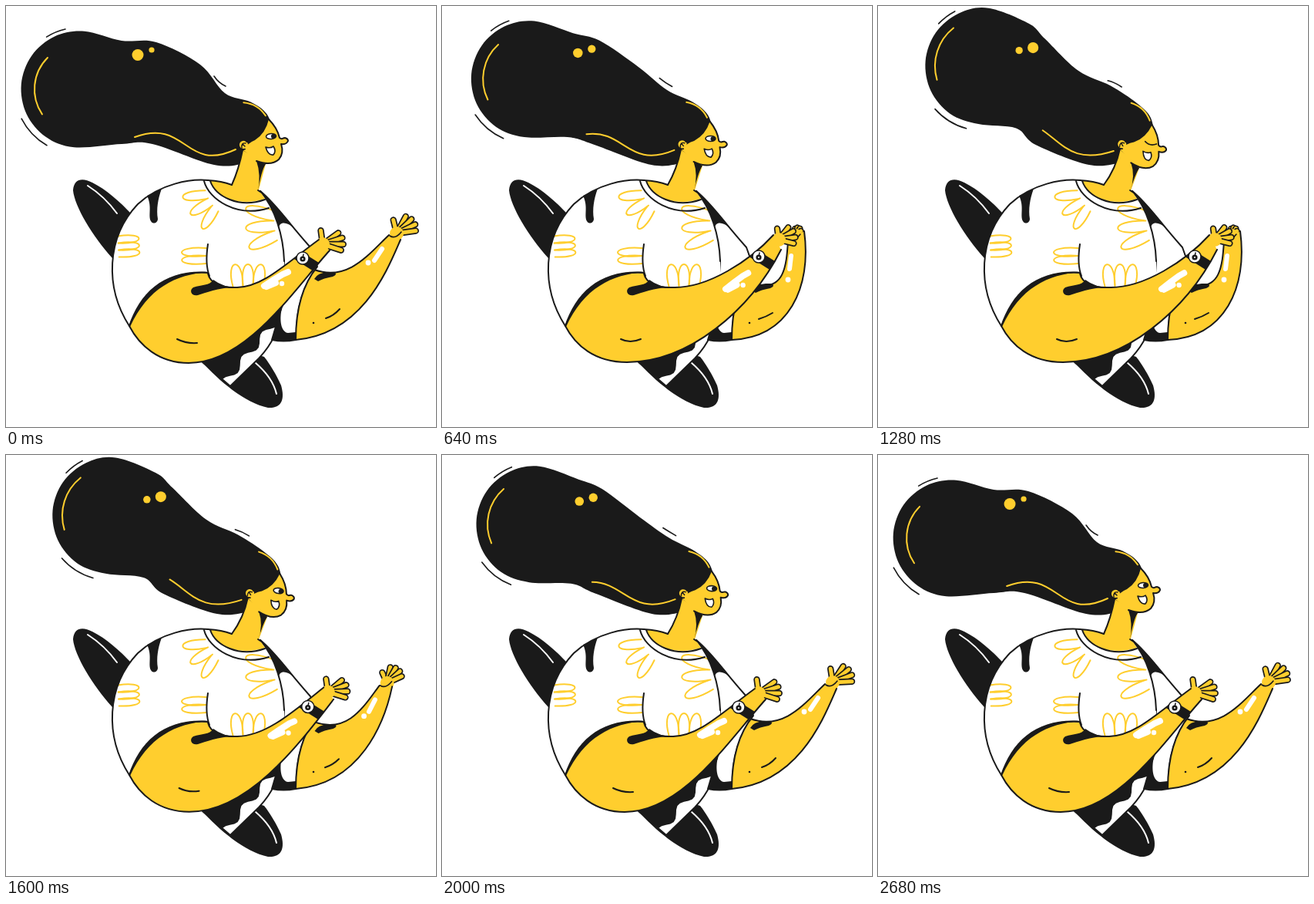
Animation of 558 by 546 pixels, one loop 2720 ms. Source, as an HTML page with a canvas:

```html
<!DOCTYPE html>
<html>
<head>
<meta charset="utf-8">
<style>
html, body { margin: 0; width: 100%; height: 100%; overflow: hidden; background: #fff; }
canvas { display: block; width: 558px; height: 546px; }
</style>
</head>
<body>
<canvas id="stage" width="558" height="546"></canvas>
<script>
const ctx = document.getElementById('stage').getContext('2d');
const INK = '#1a1a1a', SUN = '#ffce2e', WHITE = '#fff';
const LOOP = 2720, STEP = 40, RAD = Math.PI / 180;
const NAPE = { x: 316, y: 217 };

const clamp = v => Math.max(0, Math.min(1, v));
const ramp = (t, from, to) => { const u = clamp((t - from) / (to - from)); return u * u * (3 - 2 * u); };
const lerp = (a, b, k) => a + (b - a) * k;
const mix = (a, b, k) => a.map((v, i) => lerp(v, b[i], k));
const polar = (x, y, r, deg) => [x + r * Math.cos(deg * RAD), y + r * Math.sin(deg * RAD)];

function asPath(path) { return typeof path === 'string' ? new Path2D(path) : path; }
function fill(path, color) { ctx.fillStyle = color; ctx.fill(asPath(path)); }
function line(path, color = INK, width = 2) {
  ctx.strokeStyle = color;
  ctx.lineWidth = width;
  ctx.stroke(asPath(path));
}
function arc(x, y, r, from = 0, to = 360) {
  const path = new Path2D();
  path.arc(x, y, r, from * RAD, to * RAD);
  return path;
}
function dot(x, y, r, color) { fill(arc(x, y, r), color); }
function oval(x, y, rx, ry) {
  const path = new Path2D();
  path.ellipse(x, y, rx, ry, -0.08, 0, 7);
  return path;
}

// Start point followed by cubic segments, as SVG path data
const cubics = p => `${p.slice(0, 2)}C${p.slice(2)}`;

function smoothLoop(points) {
  const path = new Path2D(), n = points.length;
  points.forEach((b, i) => {
    const a = points[(i + n - 1) % n], c = points[(i + 1) % n], d = points[(i + 2) % n];
    if (!i) path.moveTo(...b);
    path.bezierCurveTo(b[0] + (c[0] - a[0]) / 6, b[1] + (c[1] - a[1]) / 6,
      c[0] - (d[0] - b[0]) / 6, c[1] - (d[1] - b[1]) / 6, ...c);
  });
  return path;
}

function turned(x, y, angle) {
  const dx = x - NAPE.x, dy = y - NAPE.y, c = Math.cos(angle), s = Math.sin(angle);
  return [NAPE.x + dx * c - dy * s, NAPE.y + dx * s + dy * c];
}

function drawLegs() {
  fill('M138 327C112 298 89 260 87 239C88 224 99 222 112 229C130 238 147 253 164 271Z', INK);
  line('M106 233Q128 247 144 269', WHITE);
  fill('M255 462C275 485 310 515 340 521C358 522 362 510 357 492C350 477 343 465 335 455L290 440Z', INK);
  line('M324 463Q346 482 351 503', WHITE);

  const thigh = 'M255 462L291 493L328 457C346 438 354 420 357 392L270 400Z';
  fill(thigh, WHITE);
  let shorts = 'M260 420L255 462';
  for (let s = 0; s <= 1.001; s += 0.04) {
    const bulge = 10 * Math.sin(3 * Math.PI * s) ** 2;
    shorts += `L${lerp(281, 357, s) + bulge * 0.76} ${lerp(484, 393, s) + bulge * 0.65}`;
  }
  fill(shorts + 'Z', INK);
  line(thigh);
}

function drawHand(x, y, { thumb, aim, spread, count, reach }) {
  const finger = (deg, length) => {
    const path = new Path2D();
    path.moveTo(x, y);
    path.lineTo(...polar(x, y, length, deg));
    line(path, INK, 8.4);
    line(path, SUN, 5);
  };
  finger(thumb, reach * 0.72);
  for (let i = 0; i < count; i++) finger(aim + i * spread, reach + Math.sin(i * Math.PI / (count - 1)) * 2);
  dot(x, y, 9, SUN);
}

function drawLimb(top, low, cuff) {
  const [topLine, lowLine] = [cubics(top), cubics(low)];
  const limb = new Path2D(`M${topLine}L${lowLine}${cuff}Z`);
  fill(limb, SUN);
  line(`M${topLine}M${lowLine}`);
  return limb;
}

function inside(path, paint) {
  ctx.save();
  ctx.clip(asPath(path));
  paint();
  ctx.restore();
}

function drawBackArm(clap, wrist) {
  const at = (a, b) => mix(a, b, clap);
  const [px, py] = at([507, 295], [459, 298]);
  drawHand(px, py, {
    thumb: -104 + wrist, aim: lerp(-62, -85, clap) + wrist, spread: 18, count: 4, reach: lerp(25, 9, clap)
  });
  const arm = drawLimb(
    at([400,342, 445,358, 472,320, 497,297], [405,360, 445,372, 447,335, 449,305]),
    at([512,303, 495,342, 463,425, 376,433], [470,292, 480,365, 450,430, 376,433]),
    'Q374 385 402 340');
  line(`M${px - 9} ${py + 3}Q${px - 2} ${py + 8} ${px + 6} ${py - 2}`, INK, 1.6);
  inside(arm, () => {
    const [x, y, dx, dy] = at([478,330, 10,-15], [451,341, 2,-17]);
    line(`M${x} ${y}l${dx} ${dy}`, WHITE, 6);
  });
  dot(...at([470, 333], [449, 355]), 3.4, WHITE);
  const [ex, ey] = at([415, 405], [411, 406]);
  line(`M${ex} ${ey}q10 -3 18 ${lerp(-12, -8, clap)}`);
  dot(399, 411, 1.3, INK);

  const sleeve = 'M330 240C352 258 365 280 395 313L404 338Q376 372 376 433Q360 436 345 433L357 392L361 331Z';
  fill(sleeve, INK);
  fill('M361 331C359 310 356 299 354 289C354 278 366 281 372 287L395 313L402 338L361 364Z', WHITE);
  fill('M402 340L384 358C370 374 360 383 357 397C355 411 358 423 366 424L376 423Q376 375 402 340Z', WHITE);
  line(sleeve);
  ctx.save();
  ctx.translate(clap * 2, clap * 15);
  fill('M400 354Q404 346 418 345L426 345Q431 348 424 351Q412 353 405 357Z', INK);
  ctx.restore();
}

function drawPetals(x, y, aim, { count = 3, fan = 0, gap = 9, length = 28 }) {
  for (let i = 0; i < count; i++) {
    const side = i - (count - 1) / 2;
    ctx.save();
    ctx.translate(x, y);
    ctx.rotate(aim * RAD);
    ctx.translate(0, side * gap);
    ctx.rotate(side * fan * RAD);
    const w = gap / 2, tip = length * 1.33;
    line(`M0 ${-w}C${tip} ${-w * 1.8} ${tip} ${w * 1.8} 0 ${w}`, SUN);
    ctx.restore();
  }
}

function drawBody() {
  const back = 'M160 415C128 365 130 300 171 257C200 230 240 224 262 226';
  const torso = back + 'L330 240C350 262 360 300 361 331L361 365L290 385Z';
  fill(torso, WHITE);
  inside(torso, () => {
    drawPetals(265, 254, 148, { fan: 26, gap: 11, length: 30 });
    drawPetals(348, 285, 175, { fan: 20, gap: 13, length: 37 });
    drawPetals(146, 312, -3, { length: 27 });
    drawPetals(260, 324, 179, { count: 2, gap: 10, length: 32 });
    drawPetals(314, 363, -90, { fan: 8, gap: 13, length: 28 });
  });
  fill('M183 246C190 260 184 272 188 279C191 284 197 281 197 276C195 264 197 250 202 237Z', INK);
  line(back);
  line('M330 240C349 262 360 298 361 331');
  line('M262 309Q258 335 264 350');
}

function drawFrontArm(clap) {
  const at = (a, b) => mix(a, b, clap);
  drawHand(...at([411, 309], [437, 303]), {
    thumb: -98, aim: lerp(-36, -52, clap), spread: lerp(18, 22, clap), count: 4, reach: lerp(25, 20, clap)
  });
  const arm = drawLimb(
    at([262,347, 265,360, 280,366, 300,365, 334,364, 362,335, 406,303],
       [262,347, 265,360, 280,366, 300,365, 345,366, 400,330, 430,297]),
    at([420,317, 372,370, 312,463, 237,463, 198,463, 173,440, 160,415],
       [440,316, 400,395, 320,462, 240,462, 198,462, 173,440, 160,415]),
    'C178 370 210 343 262 347');
  fill('M159 416C174 369 208 341 263 345C220 348 184 366 161 416Z', INK);
  line('M160 415C178 370 210 343 262 346');
  fill('M300 365C278 364 259 372 249 375C241 377 237 369 243 365C254 361 264 363 269 355Q282 365 300 365Z', INK);
  line(`M${lerp(222, 232, clap)} 432q12 6 26 ${lerp(5, 0, clap)}`);

  const [x, y] = at([385, 327], [411, 325]);
  inside(arm, () => line(`M${x - 18} ${y - 11}L${x + 20} ${y + 13}`, INK, 13));
  dot(x, y, 8, WHITE);
  line(arc(x, y, 8), INK, 1.5);
  dot(x, y + 1, 3.6, INK);
  line(`M${x} ${y}l1 -5`, INK, 1.5);
  dot(x, y + 1, 1, WHITE);

  inside(arm, () => {
    ctx.translate(...at([335, 363], [368, 367]));
    ctx.rotate(-0.09 * clap);
    line('M0 0Q12 -8 24 -15L31 -18', WHITE, 8);
    line('M3 1L15 -4', WHITE, 8);
    dot(23, -3, 3.2, WHITE);
  });
}

function drawHair(k, tilt) {
  const at = (a, b) => mix(a, b, k);
  const [x, y] = at([95, 108], [138, 77]);
  const [capX, capY] = turned(305, 163, tilt);
  const outline = [];
  for (let deg = 95; deg <= 275; deg += 30) outline.push(polar(x, y, 75.5, deg));
  outline.push(at([150, 45], [197, 22]), at([195, 47], [217, 42]), at([252, 76], [260, 84]), at([284, 113], [302, 103]));
  for (let deg = -72; deg <= 80; deg += 38) outline.push(polar(capX, capY, 40.5, deg + k * 10));
  outline.push(at([270, 206], [274, 206]), at([190, 179], [205, 180]), at([150, 179], [180, 158]));
  fill(smoothLoop(outline), INK);

  line(arc(x, y, lerp(58, 63, k), 146 + 18 * k, 225 + 7 * k), SUN);
  line('M' + cubics(at([167,170, 235,145, 232,217, 298,186], [215,161, 240,180, 255,205, 306,188])), SUN);
  const sway = -15 * k;
  line(arc(x, y, 80, 238 + sway, 257 + sway), INK, 1.6);
  line(arc(x, y, 84, 120 + sway, 153 + sway), INK, 1.6);
  const [bx, by, dx, dy] = at([270,91, 6,9], [299,97, 9,2]);
  line(`M${bx} ${by}q${dx} ${dy} ${lerp(15, 18, k)} ${lerp(13, 8, k)}`, INK, 1.6);
  dot(...at([171, 63.5, 7.5], [183.5, 57.5, 4.6]), SUN);
  dot(...at([189, 57, 3.6], [201.5, 54, 7.2]), SUN);
}

function drawNeck(tilt) {
  const ear = turned(307, 187, tilt), jaw = turned(325, 201, tilt), chin = turned(337, 205, tilt);
  const left = `M${ear}Q${ear[0] - 5} ${ear[1] + 25} 293 232`;
  fill('M265 227C270 245 300 262 336 250L328 238L293 232Q280 226 265 227Z', SUN);
  fill(`${left}L300 245L327 242L${chin}Z`, SUN);
  fill(`M${jaw}L${chin}Q${chin[0] - 6} ${chin[1] + 9} 327 241Q${jaw[0] + 6} ${jaw[1] + 17} ${jaw}Z`, INK);
  line(left);
  line('M257 227C263 251 300 275 341 262M265 227C272 247 302 263 336 251M262 226Q280 227 293 232M327 239L333 243');
}

function drawEye(x, y, open) {
  if (open < 0.1) return line(`M${x - 7} ${y + 1}Q${x} ${y + 6} ${x + 8} ${y + 1}`, INK, 1.8);
  const eye = oval(x, y, 6.5, 3.5 * open);
  fill(eye, WHITE);
  line(eye, INK, 1.6);
  fill(oval(x + 3, y, 3, 3 * open), INK);
}

function drawFace(tilt, open) {
  ctx.save();
  ctx.translate(NAPE.x, NAPE.y);
  ctx.rotate(tilt);
  ctx.translate(-NAPE.x, -NAPE.y);
  line(arc(305, 163, 38, -85, -33), SUN);
  const profile = 'M341 147Q352 158 355 171C359 174 358 171 362 171Q366 172 366 175Q364 180 357 179Q361 191 354 199Q344 208 325 201';
  fill(profile + 'L308 187Q313 178 323 174Q337 165 341 147Z', SUN);
  line(profile);

  dot(308, 180, 6, SUN);
  line(arc(308, 180, 6, 70, 320), INK, 1.8);
  line('M306 184Q305 177 311 178M307 179l3 3', INK, 1.4);

  const mouth = 'M337 183Q343 185 347 182Q351 188 347 193Q340 194 337 183Z';
  fill(mouth, WHITE);
  line(mouth, INK, 1.6);
  drawEye(344, 169, open);
  ctx.restore();
}

function draw(now) {
  const t = Math.floor((now % LOOP) / STEP) * STEP;
  const swing = ramp(t, 0, 1420) - ramp(t, 1420, LOOP);
  const clap = ramp(t, 280, 640) - ramp(t, 1360, 1720);
  const wrist = -11 * ramp(t, 0, 320) + 16 * ramp(t, 1560, 2000) - 5 * ramp(t, 2100, LOOP);
  const tilt = 13 * RAD * swing;
  const eyeOpen = clamp(Math.abs(t - 1290) / 90 - 0.4);

  ctx.lineCap = ctx.lineJoin = 'round';
  ctx.fillStyle = WHITE;
  ctx.fillRect(0, 0, 558, 546);
  drawLegs();
  drawBackArm(clap, wrist);
  drawBody();
  drawHair(swing, tilt);
  drawNeck(tilt);
  drawFace(tilt, eyeOpen);
  drawFrontArm(clap);
  requestAnimationFrame(draw);
}
requestAnimationFrame(draw);
</script>
</body>
</html>
```
